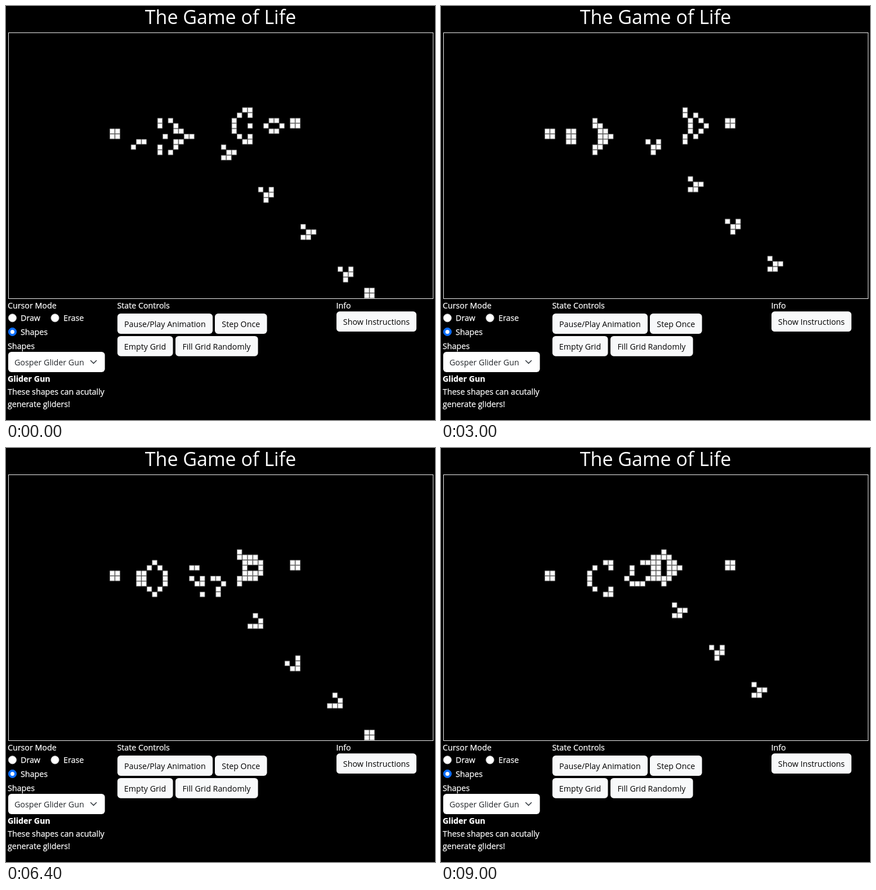
An HTML page that plays this animation: 762x735 px, repeating every 9.14 s.

```html
<!DOCTYPE html>
<html lang="en">
<head>
<meta charset="utf-8">
<title>The Game of Life</title>
<style>
  html, body { margin: 0; width: 100%; height: 100%; overflow: hidden; background: #000; }
  svg { display: block; width: 762px; height: 735px; }
  text { font: 14.25px "Open Sans", "Noto Sans", sans-serif; fill: #fff; }
  .label text { stroke: #fff; stroke-width: .25px; }
  .title { font-size: 34px; }
  .bold { font-weight: 700; }
  .mid { text-anchor: middle; }
  .dark text { fill: #000; }
  .dark rect { fill: #f8f9fa; height: 35.8px; rx: 5.7px; }
  .dark .select { fill: #fff; }
  .dark .choice { fill: #212529; }
  .radio { fill: #fff; stroke: #bfbfbf; stroke-width: .94px; }
  .checked { fill: #0d6efd; stroke: #0d6efd; }
  #cells { fill: #fff; stroke: #808080; stroke-width: .94px; }
</style>
</head>
<body>
<svg viewBox="0 0 762 735">
  <rect width="762" height="735"/>
  <text class="title mid" x="381" y="32">The Game of Life</text>
  <path id="cells"/>
  <rect x="4.53" y="47.53" width="754.2" height="471.94" fill="none" stroke="#fff" stroke-width=".94"/>

  <circle class="radio" cx="11.4" cy="553.8" r="7.1"/>
  <circle class="radio" cx="87" cy="553.8" r="7.1"/>
  <circle class="radio checked" cx="11.4" cy="578.4" r="7.1"/>
  <circle cx="11.4" cy="578.4" r="3.5" fill="#fff"/>

  <g class="label">
    <text x="3" y="537">Cursor Mode</text>
    <text x="26" y="559">Draw</text>
    <text x="102" y="559">Erase</text>
    <text x="26" y="584">Shapes</text>
    <text x="3" y="609">Shapes</text>
    <text class="bold" x="3" y="667">Glider Gun</text>
    <text x="3" y="690">These shapes can acutally</text>
    <text x="3" y="712">generate gliders!</text>
    <text x="197.5" y="537">State Controls</text>
    <text x="586.5" y="537">Info</text>
  </g>

  <g class="dark">
    <rect class="select" x="3.9" y="614.1" width="171.7"/>
    <text class="choice" x="15" y="638">Gosper Glider Gun</text>
    <path d="M150.5 629.5l5 5 5-5" fill="none" stroke="#343a40" stroke-width="1.6" stroke-linecap="round" stroke-linejoin="round"/>
    <rect x="197.9" y="546.1" width="169.2"/>
    <text class="mid" x="282.3" y="570">Pause/Play Animation</text>
    <rect x="371" y="546.1" width="92.6"/>
    <text class="mid" x="417.3" y="570">Step Once</text>
    <rect x="197.9" y="585.9" width="98.6"/>
    <text class="mid" x="247" y="610">Empty Grid</text>
    <rect x="301" y="585.9" width="146.6"/>
    <text class="mid" x="374" y="610">Fill Grid Randomly</text>
    <rect x="587" y="542.3" width="142"/>
    <text class="mid" x="658" y="566">Show Instructions</text>
  </g>
</svg>
<script>
const COLS = 80, ROWS = 50, SIZE = 9.42, LEFT = 5, TOP = 48;
const EDGE = 0.47, INNER = SIZE - 2 * EDGE;
const GENERATIONS = 73, LOOP = 9140;

const BLOCK = "OO/OO";
const GLIDER_A = "O../.OO/OO.";
const GLIDER_B = "O.O/.OO/.O.";

let grid = new Uint8Array(COLS * ROWS);

function place(col, row, art) {
  art.split("/").forEach((line, y) => [...line].forEach((ch, x) => {
    if (ch === "O") grid[(row + y) * COLS + col + x] = 1;
  }));
}

place(19, 18, BLOCK);
place(23, 20, ".OO/O..");
place(28, 16, "O.O/O..O/...OO/.O...OO/...OO/O..O/O.O");
place(42, 14, "..OO/.O.O/O/O..O/O/.O.O/..OO");
place(48, 16, ".OO./O..O/.OO.");
place(53, 16, BLOCK);
place(40, 21, GLIDER_A);
place(47, 29, GLIDER_B);
place(55, 36, GLIDER_A);
place(62, 44, GLIDER_B);
place(67, 48, BLOCK);

// Cells beyond the edges count as dead.
const alive = (col, row) =>
  col >= 0 && row >= 0 && col < COLS && row < ROWS ? grid[row * COLS + col] : 0;

function step() {
  return grid.map((self, i) => {
    const col = i % COLS, row = Math.floor(i / COLS);
    let sum = -self;
    for (let dy = -1; dy <= 1; dy++)
      for (let dx = -1; dx <= 1; dx++) sum += alive(col + dx, row + dy);
    return sum === 3 || (self && sum === 2) ? 1 : 0;
  });
}

function outline() {
  let d = "";
  grid.forEach((on, i) => {
    if (!on) return;
    const x = LEFT + (i % COLS) * SIZE + EDGE;
    const y = TOP + Math.floor(i / COLS) * SIZE + EDGE;
    d += `M${x.toFixed(2)} ${y.toFixed(2)}h${INNER}v${INNER}h${-INNER}z`;
  });
  return d;
}

// Generations land on ticks of 1/15 s: two ticks each, now and then only one.
function startTime(k) {
  const ticks = 2 * k - Math.floor((k + 5.3) / 8.4);
  return Math.round(ticks * 100 / 15) * 10;
}

const scenes = Array.from({ length: GENERATIONS }, (_, k) => {
  const scene = { start: startTime(k), d: outline() };
  grid = step();
  return scene;
});

const cells = document.getElementById("cells");
const origin = performance.now();
let shown = -1;

function draw() {
  const t = Math.max(0, performance.now() - origin) % LOOP;
  let k = GENERATIONS - 1;
  while (scenes[k].start > t) k--;
  if (k !== shown) cells.setAttribute("d", scenes[shown = k].d);
  requestAnimationFrame(draw);
}
draw();
</script>
</body>
</html>
```
